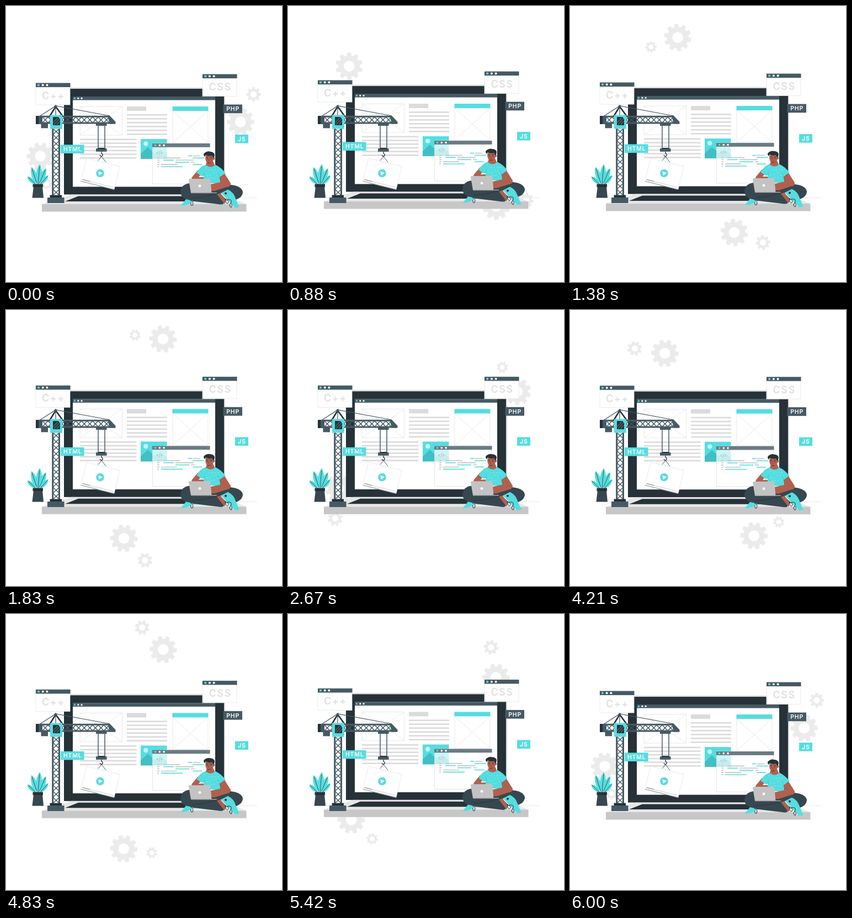
An HTML page that plays this animation: 500x500 px, repeating every 6.04 s.

```html
<!DOCTYPE html>
<html lang="en">
<head>
<meta charset="utf-8">
<title>Website under construction</title>
<style>
html, body { margin: 0; width: 100%; height: 100%; overflow: hidden; background: #fff; }
svg { display: block; width: 100vw; height: 100vh; }
text { font-family: Inter, "Open Sans", sans-serif; text-anchor: middle; }
.float { animation: float 6040ms linear infinite; }
#gears { fill: #ebebeb; transform-origin: 249px 239px; animation: orbit 6040ms linear infinite; }
@keyframes float {
  0%, 24.834%, 49.669%, 74.503%, 99.338%, 100% { transform: translateY(0); }
  12.417%, 37.252%, 62.086%, 86.921% { transform: translateY(-6px); }
}
@keyframes orbit {
  0% { transform: rotate(0deg); }
  30.3% { transform: rotate(110.8deg); }
  80% { transform: rotate(291deg); }
  100% { transform: rotate(361.2deg); }
}
.dark { fill: #263238; }
.slate { fill: #455a64; }
.leg { fill: #37474f; }
.teal { fill: #55dde0; }
.skin { fill: #b1604f; }
.white { fill: #fff; }
.grey { fill: #dbdbdb; }
.page { fill: #fff; stroke: #e6e6e6; stroke-width: .8; }
.thin { fill: none; stroke: #e4e4e4; stroke-width: .8; }
.steel { fill: none; stroke: #455a64; }
.ink { fill: none; stroke: #263238; }
.title { font-size: 18px; font-weight: 600; letter-spacing: 1.5px; fill: #e0e0e0; }
.tag { font-size: 10.5px; font-weight: 600; letter-spacing: .8px; fill: #fff; }
</style>
</head>
<body>
<svg viewBox="0 0 500 500">
  <path class="thin" d="M45 347.5H455"/>
  <g id="gears"></g>

  <g class="float">
    <!-- laptop -->
    <rect x="116" y="147.6" width="281" height="194" fill="#dcdcdc"/>
    <rect class="dark" x="105" y="150" width="290" height="191.5"/>
    <path fill="#e6e6e6" d="M65 359L118 341.5H390L435.500 359Z"/>
    <path class="dark" d="M107 354L131 344.500H372L398 354Z"/>
    <rect x="65" y="359" width="370.500" height="13.500" fill="#c7c7c7"/>
    <rect class="white" x="121" y="164" width="258" height="163.500"/>
    <rect class="slate" x="121" y="164" width="258" height="6.500"/>
    <g data-dots="124.500 167.200 6.300 1.600"></g>

    <!-- page -->
    <path class="thin" d="M134 182H210.500V234H134ZL210.500 234M210.500 182L134 234"/>
    <rect class="grey" x="219" y="182" width="35" height="8"/>
    <g id="copy" class="grey"></g>
    <path class="thin" d="M302 190V248H366V190L302 248M302 190L366 248"/>
    <rect class="teal" x="301.500" y="182" width="65" height="8"/>
    <rect class="teal" x="244" y="241" width="47.500" height="36"/>
    <circle cx="253.200" cy="249.500" r="4.300" fill="#c2f3f4"/>
    <path fill="#41bfc4" d="M244 268L257 256L269 267L280 260L291.500 270V277H244Z"/>

    <!-- code editor -->
    <rect x="265.400" y="249" width="103.600" height="73" fill="#fff" fill-opacity=".7" stroke="#e0e0e0" stroke-width=".8"/>
    <rect x="265" y="249" width="104.500" height="6.800" fill="#6a7b83"/>
    <g data-dots="270.500 252.400 7.800 1.800"></g>
    <text x="278" y="269" font-size="7.500" fill="#a9b7bb">&lt;/&gt;</text>
    <g id="code" fill="none" stroke-width="1.600"></g>

    <!-- windows and tags -->
    <rect class="page" x="54" y="139.500" width="62" height="39.500"/>
    <rect class="slate" x="54" y="139.500" width="62.500" height="7.500"/>
    <g data-dots="59 143.200 7.700 2"></g>
    <text class="title" x="86" y="169">C++</text>
    <rect class="page" x="356" y="124" width="62" height="39.500"/>
    <rect class="slate" x="356" y="123.500" width="62.500" height="7.500"/>
    <g data-dots="361.200 127.300 7.700 2"></g>
    <text class="title" x="388" y="153">CSS</text>
    <rect class="slate" x="393.500" y="178.500" width="34.500" height="15.700"/>
    <text class="tag" x="411.200" y="190.200">PHP</text>
    <rect class="teal" x="415" y="233" width="24" height="15.500"/>
    <text class="tag" x="427.300" y="244.700">JS</text>
  </g>

  <!-- plant -->
  <g id="leaves"></g>
  <path class="leg" d="M50 326H66L68 347.500H47.500Z"/>
  <rect class="dark" x="48.500" y="322.500" width="18.500" height="5.500"/>

  <!-- crane -->
  <path class="steel" d="M62 199L90 181L188 199" stroke-width="1.200"/>
  <path class="ink" d="M79 200L90 182L103 200" stroke-width="2.600"/>
  <path class="ink" d="M90 181V200" stroke-width="1"/>
  <circle class="slate" cx="90" cy="181.500" r="2.200"/>
  <path id="lattice" class="steel" stroke-width="1.500"/>
  <path class="steel" d="M60 200.300H187L197 210.500M60 212H198" stroke-width="3"/>
  <path class="slate" d="M184 199H188L198.500 210V213.500H188Z"/>
  <rect class="dark" x="54" y="199" width="6" height="15"/>
  <rect class="slate" x="59" y="199" width="7" height="15"/>
  <rect class="slate" x="63.500" y="213" width="12.500" height="8.300"/>
  <path class="steel" d="M84.700 222V344M96.500 222V344" stroke-width="3"/>
  <rect class="dark" x="79.500" y="342.500" width="21.500" height="5"/>
  <rect class="slate" x="75" y="347" width="30.500" height="10"/>
  <rect class="teal" x="80" y="197.500" width="22" height="25"/>
  <path class="dark" d="M85 201H95L98 205V216H85Z"/>
  <path d="M86 211L94 202M87 215L97 204M92 215L97 209" fill="none" stroke="#52666f" stroke-width="1.400"/>

  <!-- hook and hanging card -->
  <rect class="slate" x="163" y="212.500" width="19.500" height="4.500"/>
  <path class="steel" d="M167 217V259M179 217V259" stroke-width="1.500"/>
  <rect class="slate" x="163" y="258" width="19.500" height="5.800"/>
  <rect class="dark" x="167" y="257" width="12" height="2"/>
  <path class="ink" d="M173 264V267Q177 269 174 272Q171 273 170 270" stroke-width="1.300"/>
  <g transform="rotate(14 171 304)">
    <rect class="page" x="140" y="282.500" width="62" height="43"/>
    <path d="M140 325.500H202" stroke="#a6a6a6" stroke-width="1.200"/>
    <path d="M142 322H199" stroke="#d0d0d0" stroke-width="1"/>
    <path d="M142 322H156" stroke="#8f9a9e" stroke-width="1.200"/>
  </g>
  <path class="ink" d="M167 280L173 272.500L181 283" stroke-width=".8"/>
  <circle class="teal" cx="170.500" cy="303" r="7.300"/>
  <path class="white" d="M167.300 299.500L175 302.500L168.700 307Z"/>

  <g class="float">
    <rect class="teal" x="99" y="251.300" width="42.500" height="15.700"/>
    <text class="tag" x="120.700" y="263">HTML</text>

    <!-- seated man -->
    <path class="leg" d="M378 327Q398 321 414 325Q429 329 429 338Q427 350 410 352L375 353Z"/>
    <path class="leg" d="M333 321Q317 323 316 337Q317 349 334 353L388 359.500Q396 360 395 354L380 331Q355 320 333 321Z"/>
    <path d="M336 348Q360 347 383 339" fill="none" stroke="#263238" stroke-width=".8"/>
    <path class="skin" d="M382 341L391 338L398 353L396 359Z"/>
    <path class="teal" d="M326 350L339 353L334 358L323 361.500L316.500 361Q322 356 326 350Z"/>
    <path class="ink" d="M334 352Q341 354 338 361Q334 363 335 356" stroke-width="1"/>
    <path class="teal" d="M389 339L402 332.500Q411 337 414 344L422.500 364Q417 367 412 363.500Z"/>
    <path d="M390 340L412 363.500" stroke="#fff" stroke-width="1.200"/>
    <circle class="dark" cx="398" cy="339.500" r="2"/>
    <path class="ink" d="M399 349Q395 354 401 358Q406 354 400 351Q410 349 408 356Q402 362 408 365Q412 360 406 357" stroke-width="1"/>

    <path class="skin" d="M348 297L337 310Q334 316 341 317H358V310H349L357 301Z"/>
    <path class="teal" d="M361 287.500L378 287Q390 292 397.500 303L387 310.500L389 321H358L358 307L355 309L345.500 302Q351 291 361 287.500Z"/>
    <path d="M387 310L383 302M358 308L360 300" stroke="#3fbfc6" stroke-width=".8"/>
    <g id="specks" class="white"></g>
    <path class="skin" d="M396 303.500L407 321Q408 327 400 328L378 335L370 335V323L389 319L387 310.500Z"/>
    <path class="skin" d="M364 281H375L378 288Q372 295 362 288Z"/>
    <ellipse class="skin" cx="368.300" cy="276.500" rx="7.200" ry="9.800" transform="rotate(-8 368 276)"/>
    <circle class="skin" cx="376" cy="276.500" r="2.400"/>
    <path class="dark" d="M360 273Q356 269 360 266Q365 262 370 264Q376 264 378 269Q378 273 376 276L373 271Q367 273 362 270Z"/>
    <path class="ink" d="M363 274.500L366 274M369.500 274L373 274.500M365.500 284Q368 285 370.500 283.500" stroke-width=".9"/>
    <circle class="dark" cx="365" cy="276.700" r=".8"/>
    <circle class="dark" cx="371" cy="276.700" r=".8"/>
    <path d="M367.500 277L366.700 280.500H368.500" fill="none" stroke="#7f3e36" stroke-width=".7"/>

    <path d="M333 313H368.500Q370 313 370.300 314.500L372.500 338.500H335L331 315Q331 313 333 313Z" fill="#c3c3c3"/>
    <path d="M335 338.500H382" stroke="#a6a6a6" stroke-width="1.500"/>
    <circle class="white" cx="351" cy="326" r="2.400"/>
  </g>
</svg>

<script>
const $ = id => document.getElementById(id);
const range = n => [...Array(n).keys()];

function polar(r, deg) {
  const a = deg * Math.PI / 180;
  return [r * Math.cos(a), r * Math.sin(a)];
}

// Cog outline with a round hole, placed on the orbit.
function gear(orbit, deg, teeth, outer, root, hole) {
  const step = 360 / teeth;
  const profile = [[root, -.34], [outer, -.22], [outer, .22], [root, .34]];
  const points = range(teeth).flatMap(i =>
    profile.map(([r, k]) => polar(r, (i + k) * step).map(v => v.toFixed(2))));
  const [x, y] = polar(orbit, deg);
  const ring = `M${hole} 0A${hole} ${hole} 0 1 0 ${-hole} 0A${hole} ${hole} 0 1 0 ${hole} 0Z`;
  return `<path fill-rule="evenodd" transform="translate(${249 + x} ${239 + y})" d="M${points.join('L')}Z${ring}"/>`;
}
const big = [10, 25, 19.5, 9.8], small = [8, 13.4, 10, 5.8];
$('gears').innerHTML =
  gear(178.2, -9.4, ...big) + gear(189.7, 169.9, ...big) +
  gear(214.5, -21.6, ...small) + gear(194, 154.6, ...small.map((v, i) => i ? v * .78 : v));

// Three window buttons: x, y, gap, radius.
document.querySelectorAll('[data-dots]').forEach(g => {
  const [x, y, gap, r] = g.dataset.dots.split(' ').map(Number);
  g.innerHTML = range(3).map(i =>
    `<circle class="${i ? 'white' : 'teal'}" cx="${x + i * gap}" cy="${y}" r="${r}"/>`).join('');
});

const copyLines = (x, y, w, gap) => range(6).map(i =>
  `<rect x="${x}" y="${y + i * gap}" width="${w}" height="2.600"/>`).join('');
$('copy').innerHTML = copyLines(219, 196, 73, 7) + copyLines(134, 240.5, 102.5, 6.7);

// Each row: y, then start and end of its grey and teal runs.
const rows = [
  [271.5, [339, 352], [330, 337.5]],
  [275.4, [285, 316], [338, 359]],
  [279.3, [307, 340], [285, 304]],
  [283.2, [335, 342], [307, 332]],
  [287.1, [281, 310], [338, 355]],
  [291, [274, 277], [281, 320]]
];
$('code').innerHTML = rows.map(([y, grey, teal], i) =>
  `<path stroke="#c4c4c4" d="M${grey[0]} ${y}H${grey[1]}${i > 0 && i < 5 ? `M274 ${y}H278` : ''}"/>` +
  `<path stroke="#55dde0" d="M${teal[0]} ${y}H${teal[1]}"/>`).join('');

const cross = (x, y, w, h) => `M${x} ${y}l${w} ${h}M${x + w} ${y}l${-w} ${h}`;
$('lattice').setAttribute('d',
  range(11).map(i => cross(85, 222 + i * 11, 11.5, 11)).join('') +
  range(12).map(i => cross(66 + i * 10.1, 201, 10.1, 10.5)).join(''));

// Leaves grow from the pot: root x, root y, length, lean, half width.
$('leaves').innerHTML = [
  [56, 322, 32, -18, 5], [60, 322, 31, 24, 5], [58, 323, 37, 5, 5.5],
  [54, 323, 21, -48, 4], [62, 323, 22, 42, 4]
].map(([x, y, len, lean, w]) =>
  `<g transform="translate(${x} ${y}) rotate(${lean})">` +
  `<path class="teal" d="M0 0C${-w * 1.5} ${-len * .35} ${-w} ${-len * .75} 0 ${-len}C${w} ${-len * .75} ${w * 1.5} ${-len * .35} 0 0Z"/>` +
  `<path d="M0 0V${-len * .9}" stroke="#263238" stroke-width=".7"/></g>`).join('');

$('specks').innerHTML = range(14).map(i =>
  `<circle cx="${361 + i * 7.3 % 24}" cy="${293 + i * 4.7 % 19}" r=".5"/>`).join('');
</script>
</body>
</html>
```
